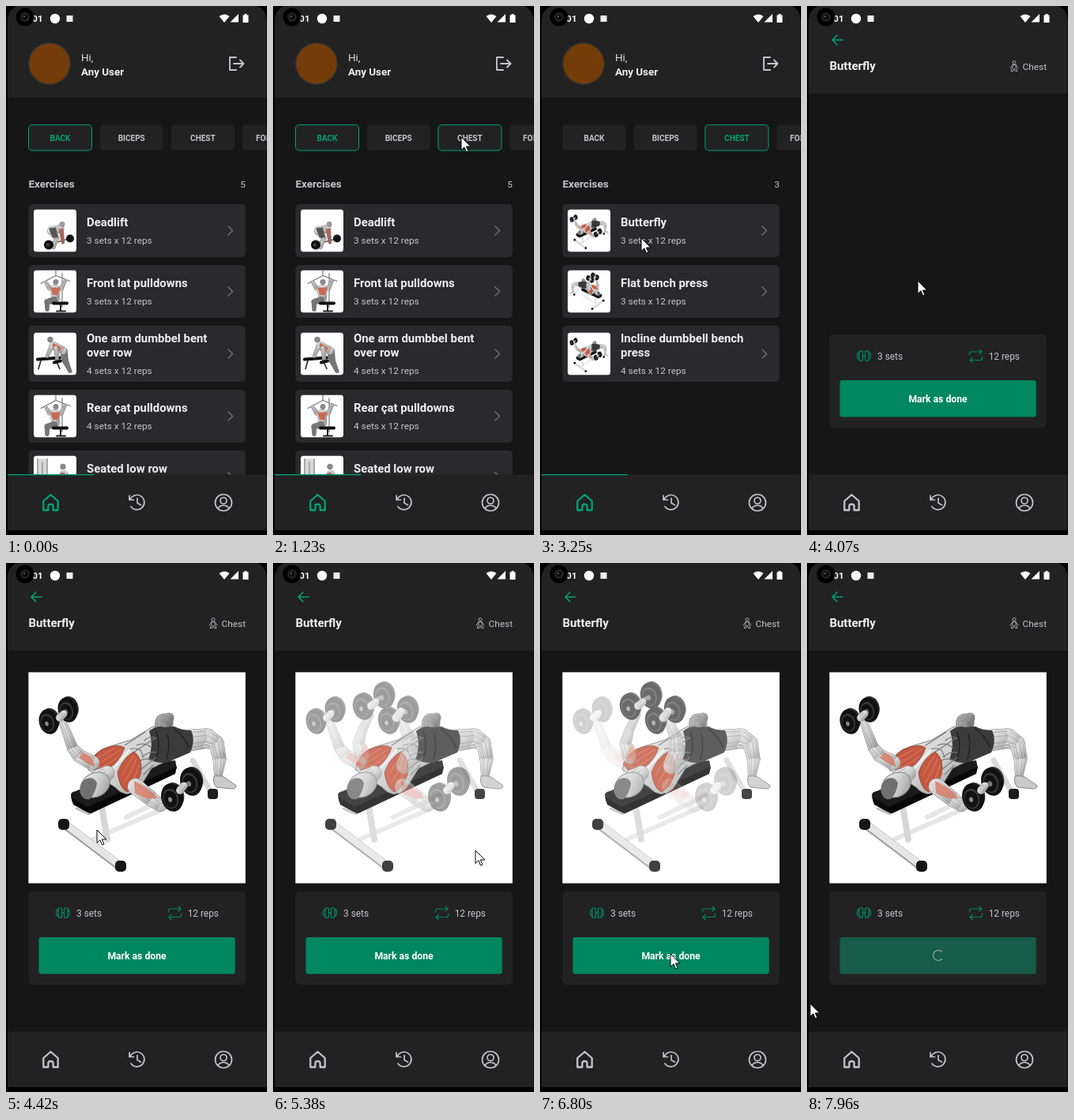
Write an HTML page that moves like this. It is 330x670 px and loops after 8 s.

```html
<!DOCTYPE html>
<html lang="en">
<head>
<meta charset="utf-8">
<title>Workout app</title>
<style>
html, body { margin: 0; width: 100%; height: 100%; overflow: hidden; background: #000; }
svg { display: block; width: 330px; height: 670px; font-family: Roboto, Inter, sans-serif; }
</style>
</head>
<body>
<svg id="stage" viewBox="0 0 330 670" xmlns="http://www.w3.org/2000/svg"></svg>
<script>
const LOOP = 8000;
const BG = '#161616', PANEL = '#222222', ITEM = '#2a2a2c', GREEN = '#00a374', BTN = '#00875f';
const GRAY = '#c4c4cc', WHITE = '#f0f0f2';
const LEFT = 28.4, WIDTH = 274.4;

const rect = (x, y, w, h, r, fill, more = '') =>
  `<rect x="${x}" y="${y}" width="${w}" height="${h}" rx="${r}" fill="${fill}" ${more}/>`;
const text = (x, y, size, str, fill, bold, anchor = 'start') =>
  `<text x="${x}" y="${y}" font-size="${size}" fill="${fill}" font-weight="${bold ? 700 : 400}" text-anchor="${anchor}">${str}</text>`;
const line = (d, color, w = 1.5, more = '') =>
  `<path d="${d}" fill="none" stroke="${color}" stroke-width="${w}" stroke-linecap="round" stroke-linejoin="round" ${more}/>`;
const fill = (d, color, more = '') => `<path d="${d}" fill="${color}" ${more}/>`;
const disc = (x, y, r, color) => `<circle cx="${x}" cy="${y}" r="${r}" fill="${color}"/>`;
const group = (id, body, more = '') => `<g id="${id}" ${more}>${body}</g>`;

/* ---- exercise drawing ---- */

// Tapered limb through points [x, y, radius], shaded with lengthwise muscle lines
function limb(pts, color = 'url(#skin)') {
  let shape = '', lines = '';
  pts.forEach(([x, y, r], i) => {
    shape += `<circle cx="${x}" cy="${y}" r="${r}"/>`;
    if (!i) return;
    const [px, py, pr] = pts[i - 1];
    const len = Math.hypot(x - px, y - py), nx = (py - y) / len, ny = (x - px) / len;
    const edge = k => [px + nx * pr * k, py + ny * pr * k, x + nx * r * k, y + ny * r * k];
    const [ax, ay, bx, by] = edge(1), [cx, cy, dx, dy] = edge(-1);
    shape += `<path d="M${ax} ${ay}L${bx} ${by}L${dx} ${dy}L${cx} ${cy}Z"/>`;
    for (const k of [-.75, -.3, .35, .7]) {
      const [x1, y1, x2, y2] = edge(k);
      lines += `M${x1} ${y1}L${x2} ${y2}`;
    }
  });
  return `<g fill="${color}"><g stroke="#858585" stroke-width="1.1">${shape}</g>${shape}</g>` +
    line(lines, '#707070', .8, 'opacity=".5"');
}

function dumbbell(x1, y1, x2, y2, r) {
  const plate = (x, y) => [[3, -2, '#2c2c2c', .92], [0, 0, '#111', 1], [-2, 1, '#383838', .72], [-2.5, 1.5, '#111', .6], [-3, 2, '#8a8a8a', .18]]
    .map(([dx, dy, c, k]) => `<ellipse cx="${x + dx}" cy="${y + dy}" rx="${r * k * .76}" ry="${r * k}" fill="${c}" transform="rotate(-14 ${x} ${y})"/>`).join('');
  return plate(x2, y2) + line(`M${x1} ${y1}L${x2 - 3} ${y2 + 2}`, '#777', 5) + plate(x1, y1);
}

const bench =
  line('M110 350L204 309M152 322L210 294', '#e6e6e6', 6) +
  line('M121 308L128 350', '#d6d6d6', 8) +
  line('M236 250L259 290', '#d9d9d9', 7) +
  rect(255, 286, 13, 13, 4, '#1c1c1c') +
  line('M74 331L144 384', '#9c9c9c', 11) + line('M74 330L144 383', '#e6e6e6', 9) +
  rect(66, 324, 14, 14, 5, '#161616') + rect(138, 377, 14, 14, 5, '#161616') +
  fill('M82 294Q82 290 88 289L170 256L214 250L216 260L109 310Q105 312 102 310L84 303Z', '#1b1b1b') +
  fill('M82 296L103 309L216 258L214 267L108 317Q105 318 101 315L85 306Z', '#080808') +
  line('M89 311L105 318', '#bbb', 2.5);

const outline = 'stroke="#858585" stroke-width="1"';
const muscle = 'stroke="#7b3526" stroke-width=".6"';
const body =
  limb([[196, 222, 10], [200, 202, 11], [206, 196, 6]], 'url(#dusk)') +
  limb([[219, 226, 14], [254, 222, 12], [266, 228, 9], [270, 248, 8], [268, 271, 4.5]]) +
  fill('M263 270Q274 268 281 275L290 281Q293 285 286 286L266 284Q261 278 263 270Z', '#cacaca', outline) +
  fill('M104 262Q108 238 132 232L158 224L186 207L210 216L217 244L184 260L168 286Q152 300 138 284Z', 'url(#skin)', outline) +
  fill('M181 213Q190 205 200 208L213 207Q222 212 234 212Q240 224 233 240L212 249Q200 257 180 249Q187 230 181 213Z', '#3b3b3b') +
  line('M204 217Q208 232 203 248M213 210Q226 220 231 233M190 214Q196 230 190 248', '#1f1f1f', 1.4) +
  line('M154 238Q160 232 170 237L174 246M165 231Q176 226 184 234M172 246Q180 238 190 240M164 254Q176 244 187 251M175 225Q182 218 190 222M158 242L188 222M170 262L190 246M174 268L186 256M150 231L176 214', '#777', 1.1) +
  fill('M105 255Q112 238 130 233Q143 229 150 234Q146 246 137 255Q126 264 111 262Z', '#c55840', muscle) +
  fill('M141 265Q148 246 162 239Q174 248 170 268Q164 286 153 290Q143 284 141 265Z', '#c55840', muscle) +
  line('M112 256Q126 250 145 236M115 260Q130 256 143 244M110 250Q122 243 137 235M147 268Q154 254 162 244M150 278Q160 262 165 248M155 285Q166 268 168 256', '#e08a72', .8) +
  line('M131 266Q143 252 156 237', '#eee', 3) +
  limb([[119, 273, 12], [128, 266, 9]]) +
  `<ellipse cx="113" cy="281" rx="19" ry="15" transform="rotate(-28 113 281)" fill="url(#skin)" ${outline}/>` +
  fill('M94 292Q91 279 102 273Q112 270 115 279Q113 292 106 299Q98 301 94 292Z', '#707070');

const poseLow =
  limb([[109, 253, 9], [92, 244, 8], [84, 234, 6.5], [72, 202, 4.5]]) +
  fill('M98 240Q112 246 112 258Q101 254 92 246Z', '#d87961', 'opacity=".8"') +
  dumbbell(54, 201, 78, 186, 16) + limb([[68, 196, 4.5], [73, 191, 4]]) +
  limb([[164, 283, 10], [184, 299, 9], [195, 307, 7.5], [214, 296, 5]]) +
  fill('M162 276Q180 284 192 298Q176 300 163 291Z', '#d87961', 'opacity=".8"') +
  dumbbell(210, 297, 234, 277, 18) + limb([[220, 288, 4.5], [225, 282, 4]]);

const poseHigh =
  limb([[113, 246, 8], [108, 229, 7], [113, 211, 5.5], [123, 192, 4]]) +
  fill('M109 253Q108 238 117 229Q123 236 120 248Z', '#d88873', 'opacity=".8"') +
  dumbbell(114, 182, 140, 168, 17) + limb([[124, 181, 4.5], [130, 176, 4]]) +
  limb([[166, 257, 10], [173, 239, 10], [172, 222, 7.5], [163, 201, 5]]) +
  dumbbell(146, 200, 170, 186, 17) + limb([[156, 196, 5], [162, 188, 4.5]]);

/* ---- thumbnails, 54 x 54 ---- */

const thumbs = {
  deadlift:
    line('M14 46L46 37', '#555', 1.5) + disc(46, 37, 5, '#151515') +
    limb([[22, 28, 4], [29, 36, 3], [25, 48, 2]]) + limb([[22, 27, 4.5], [33, 25, 5]]) +
    fill('M19 24L28 23L31 36L24 36Z', '#555') + disc(36, 19, 3.5, '#999') +
    limb([[35, 27, 2.5], [37, 42, 1.6]], '#c8604c') + disc(19, 45, 6, '#111') + disc(18, 45, 2, '#444'),
  pulldown:
    line('M9 17L28 7L46 14M28 7V0M36 4V47', '#777', 1.2) +
    limb([[20, 23, 2.5], [15, 15, 1.5]]) + limb([[35, 23, 2.5], [40, 13, 1.5]]) +
    limb([[27, 25, 6], [28, 36, 4.5]]) + fill('M21 22L34 22L30 32L24 31Z', '#c96a55') +
    disc(28, 15, 3.5, '#888') + limb([[26, 38, 4], [17, 40, 3], [17, 50, 2]], '#777') +
    line('M25 42H42', '#111', 4) + line('M34 43V52M29 52H40', '#222', 2),
  row:
    line('M5 34L33 32', '#111', 4) + line('M9 36L6 46M28 35L33 46', '#333', 1.8) +
    limb([[38, 24, 4.5], [40, 36, 3.5], [46, 49, 2]], '#777') + limb([[25, 17, 5], [37, 23, 4.5]]) +
    fill('M24 13L35 19L32 25L24 21Z', '#c96a55') + limb([[22, 19, 2.5], [17, 30, 1.7]]) +
    disc(21, 9, 3.7, '#888') + limb([[28, 20, 2.5], [30, 36, 1.8]]) + line('M26 38L34 36', '#111', 4),
  seated:
    rect(4, 4, 14, 46, 1, '#d8d8d8') + line('M5 4V50M17 4V50M11 8V48', '#888', 1.2) +
    line('M17 32L30 28', '#555', 1) + limb([[38, 24, 5], [39, 38, 4.5]]) + disc(37, 14, 3.7, '#888') +
    limb([[37, 24, 2.5], [28, 29, 1.6]], '#c96a55') + limb([[38, 40, 4], [24, 40, 2.5]], '#777') + line('M30 46H48', '#111', 4)
};
const mini = flip => `<g transform="${flip ? 'translate(54 0) scale(-1 1) ' : ''}scale(.196) translate(-28 -134)">${bench + body + (flip ? poseHigh : poseLow)}</g>`;

/* ---- app parts ---- */

function item(y, title, sub, art) {
  const h = title.length > 1 ? 71 : 67, mid = y + h / 2;
  const top = title.length > 1 ? 21 : 28;
  return rect(LEFT, y, WIDTH, h, 5, ITEM) +
    `<svg x="35" y="${mid - 27}" width="54" height="54" viewBox="0 0 54 54">${rect(0, 0, 54, 54, 4, '#fff')}${art}</svg>` +
    title.map((s, i) => text(102, y + top + i * 18, 14.9, s, WHITE, true)).join('') +
    text(102, y + top + title.length * 18 + (title.length > 1 ? 3.5 : 4), 11.8, sub, GRAY) +
    line(`M281 ${mid - 5.5}L286.5 ${mid}L281 ${mid + 5.5}`, '#77777d', 1.2);
}

const listHead = n => text(LEFT, 230, 13.5, 'Exercises', GRAY, true) + text(303, 230, 11.8, n, GRAY, false, 'end');

const backList = listHead(5) +
  item(251, ['Deadlift'], '3 sets x 12 reps', thumbs.deadlift) +
  item(328, ['Front lat pulldowns'], '3 sets x 12 reps', thumbs.pulldown) +
  item(405, ['One arm dumbbel bent', 'over row'], '4 sets x 12 reps', thumbs.row) +
  item(486, ['Rear çat pulldowns'], '4 sets x 12 reps', thumbs.pulldown) +
  item(563, ['Seated low row'], '4 sets x 12 reps', thumbs.seated);

const chestList = listHead(3) +
  item(251, ['Butterfly'], '3 sets x 12 reps', mini(false)) +
  item(328, ['Flat bench press'], '3 sets x 12 reps', mini(true)) +
  item(405, ['Incline dumbbell bench', 'press'], '4 sets x 12 reps', mini(false));

const chips = ['BACK', 'BICEPS', 'CHEST', 'FOREARM'].map((name, i) => {
  const x = 28.5 + i * 90.2;
  return `<g class="chip">${rect(x, 150.5, 80, 32.5, 4.5, PANEL)}${text(x + 40, 170.5, 10, name, GRAY, true, 'middle')}</g>`;
}).join('');

const spinner = (id, x, y, color) =>
  group(id, line('M4.6 -4.6A6.5 6.5 0 1 0 4.6 4.6', color, 1.5), `data-at="${x} ${y}"`);

const home = rect(0, 0, 330, 116, 0, PANEL) +
  disc(55, 73, 27, '#333335') + disc(55, 73, 25.5, '#743c08') +
  text(95, 70, 13.4, 'Hi,', '#dcdce0') + text(95, 88, 13.4, 'Any User', WHITE, true) +
  line('M291 65H283V81H291M288 73H300M296 68.5L300.5 73L296 77.5', GRAY, 1.9) +
  chips + group('back', backList) + group('chest', chestList) + spinner('load', 165.5, 405, GREEN);

const detail = rect(0, 0, 330, 111, 0, PANEL) +
  line('M45 43H32M38 37L32 43L38 49', GREEN, 1.6) +
  text(LEFT, 81, 15, 'Butterfly', WHITE, true) + text(303, 80.5, 11.8, 'Chest', GRAY, false, 'end') +
  line('M260 71.5A2 2 0 1 1 264 71.5A2 2 0 1 1 260 71.5M260 74.5L257 79M264 74.5L267 79M260 74.5H264M260 75V78L258 82.5H260.5L262 79L263.5 82.5H266L264 78V75', '#a5a5ab', 1) +
  group('photo', rect(LEFT, 138.4, WIDTH, 267.2, 0, '#fff') + bench + body + group('low', poseLow) + group('high', poseHigh) +
    rect(LEFT, 138.4, WIDTH, 267.2, 0, '#fff', 'id="veil"')) +
  rect(LEFT, 416, WIDTH, 118, 5, PANEL) +
  line('M70.5 443H73.5M66 438Q66 436.8 68.2 436.8Q70.5 436.8 70.5 438V448Q70.5 449.2 68.2 449.2Q66 449.2 66 448ZM73.5 438Q73.5 436.8 75.8 436.8Q78 436.8 78 438V448Q78 449.2 75.8 449.2Q73.5 449.2 73.5 448ZM66 439Q63.5 439 63.5 443Q63.5 447 66 447M78 439Q80.5 439 80.5 443Q80.5 447 78 447', BTN, 1.3) +
  line('M205.5 442V440Q205.5 438 208 438H221M218 435L221 438L218 441M221.5 444V446Q221.5 448.5 219 448.5H206M209 445.5L206 448.5L209 451.5', BTN, 1.2) +
  text(89, 447.5, 11.9, '3 sets', GRAY) + text(269, 447.5, 11.9, '12 reps', GRAY, false, 'end') +
  rect(41.5, 474, 248.2, 46.4, 3, BTN, 'id="btn"') +
  group('label', text(165.5, 502, 12.2, 'Mark as done', '#fff', true, 'middle')) +
  spinner('wait', 166, 497, '#80958d');

const status =
  text(46.5, 20, 11.5, '01', '#fff', true, 'end') + disc(24, 14, 11.5, '#000') +
  disc(24, 14, 6, '#202022') + disc(24, 14, 3, '#08080a') + disc(23, 13.2, 1, '#777') +
  disc(62, 16, 6.2, '#fff') + rect(76.5, 12, 8, 8, 0, '#eee') +
  fill('M269.5 13Q276 8 282.5 13L276 21Z', '#fff') + fill('M294 10V20.5H283.5Z', '#fff') +
  fill('M299.5 11.5H301.5V10H304.5V11.5H306.5V21H299.5Z', '#fff');

const tabs = rect(0, 593.5, 330, 71, 0, PANEL) + rect(2, 593, 109, 1.3, 0, GREEN, 'id="mark"') +
  line('M47.3 627L56.5 619L65.7 627V638.5H59.6V633.5Q59.6 631 56.5 631Q53.4 631 53.4 633.5V638.5H47.3Z', GREEN, 2.3, 'id="home-icon"') +
  line('M157 625A9.3 9.3 0 1 1 158 634M156 620V625.5H161.5M166 623.5V629.5L170.5 632', GRAY, 1.7) +
  line('M264.5 629A10.5 10.5 0 1 1 285.5 629A10.5 10.5 0 1 1 264.5 629M271 626.5A4 4 0 1 1 279 626.5A4 4 0 1 1 271 626.5M268 636.5Q270 632.5 275 632.5Q280 632.5 282 636.5', GRAY, 1.7);

const gradient = (id, ...colors) =>
  `<linearGradient id="${id}" x1="0" y1="0" x2="1" y2="1">${colors.map((c, i) =>
    `<stop offset="${i / (colors.length - 1)}" stop-color="${c}"/>`).join('')}</linearGradient>`;

const stage = document.getElementById('stage');
stage.innerHTML = `<defs>${gradient('skin', '#ececec', '#d2d2d2', '#979797') + gradient('dusk', '#b5b5b5', '#8d8d8d', '#666')}
  <clipPath id="screen"><path d="M2 664V20Q2 5 14 0H318Q329.5 5 329.5 20V664Z"/></clipPath></defs>
  <g clip-path="url(#screen)">${rect(0, 0, 330, 670, 0, BG) + group('home', home) + group('detail', detail) + tabs + status}</g>` +
  fill('M0 0V16.5L3.9 12.8L6.5 19L9 18L6.4 12H11.8Z', '#fff', 'id="cursor" stroke="#000" stroke-width="1"');

/* ---- motion ---- */

const $ = id => document.getElementById(id);
const chipEls = [...document.querySelectorAll('.chip')];
const ease = (t, a, b) => { const k = Math.min(1, Math.max(0, (t - a) / (b - a))); return k * k * (3 - 2 * k); };
const show = (id, on) => $(id).setAttribute('display', on ? 'inline' : 'none');

// [ms, x, y]
const path = [
  [330, 45, 629], [700, 130, 400], [1040, 238, 166], [1230, 238, 166], [1980, 80, 525], [2420, 80, 525],
  [2600, 30, 652], [2860, 249, 480], [3160, 128, 294], [3400, 128, 294], [4000, 140, 348], [4110, 140, 348],
  [4420, 115, 338], [4830, 55, 229], [5090, 55, 229], [5380, 256, 364], [5850, 205, 516], [6200, 140, 546],
  [6480, 133, 515], [6640, 155, 487], [6760, 165, 495], [7340, 165, 495], [7930, 4, 558], [LOOP, 4, 558]
];

function cursorAt(t) {
  const i = Math.max(1, path.findIndex(p => p[0] >= t));
  const [a, x, y] = path[i - 1], [b, u, v] = path[i];
  const k = ease(t, a, b);
  return [x + (u - x) * k, y + (v - y) * k];
}

function spin(id, on, deg) {
  show(id, on);
  $(id).setAttribute('transform', `translate(${$(id).dataset.at}) rotate(${deg})`);
}

function styleChip(el, border, chosen) {
  el.firstChild.setAttribute('stroke', border ? GREEN : 'none');
  el.lastChild.setAttribute('fill', chosen ? GREEN : GRAY);
}

function draw(t) {
  const inDetail = t >= 3330, picked = t >= 1265;
  show('home', !inDetail);
  show('detail', inDetail);
  show('mark', !inDetail);
  $('home-icon').setAttribute('stroke', inDetail ? GRAY : GREEN);

  styleChip(chipEls[0], !picked, !picked);
  styleChip(chipEls[2], t >= 1080, picked);
  show('back', !picked);
  show('chest', t >= 2220);
  spin('load', picked && t < 2220, (t - 2140) * .36);

  show('photo', t >= 4130);
  const high = ease(t, 5120, 5640) - ease(t, 6650, 7130);
  $('low').setAttribute('opacity', 1 - high);
  $('high').setAttribute('opacity', high);
  $('veil').setAttribute('opacity', Math.min(1, high * 2) * .18);

  const busy = t >= 7360;
  $('btn').setAttribute('fill', busy ? '#175d49' : t >= 7200 ? '#00a374' : BTN);
  show('label', !busy);
  spin('wait', busy, (t - 7960) * .36);

  show('cursor', t >= 330);
  $('cursor').setAttribute('transform', `translate(${cursorAt(t)})`);
}

const start = performance.now();
function tick() {
  draw((performance.now() - start) % LOOP);
  requestAnimationFrame(tick);
}
tick();
</script>
</body>
</html>
```
